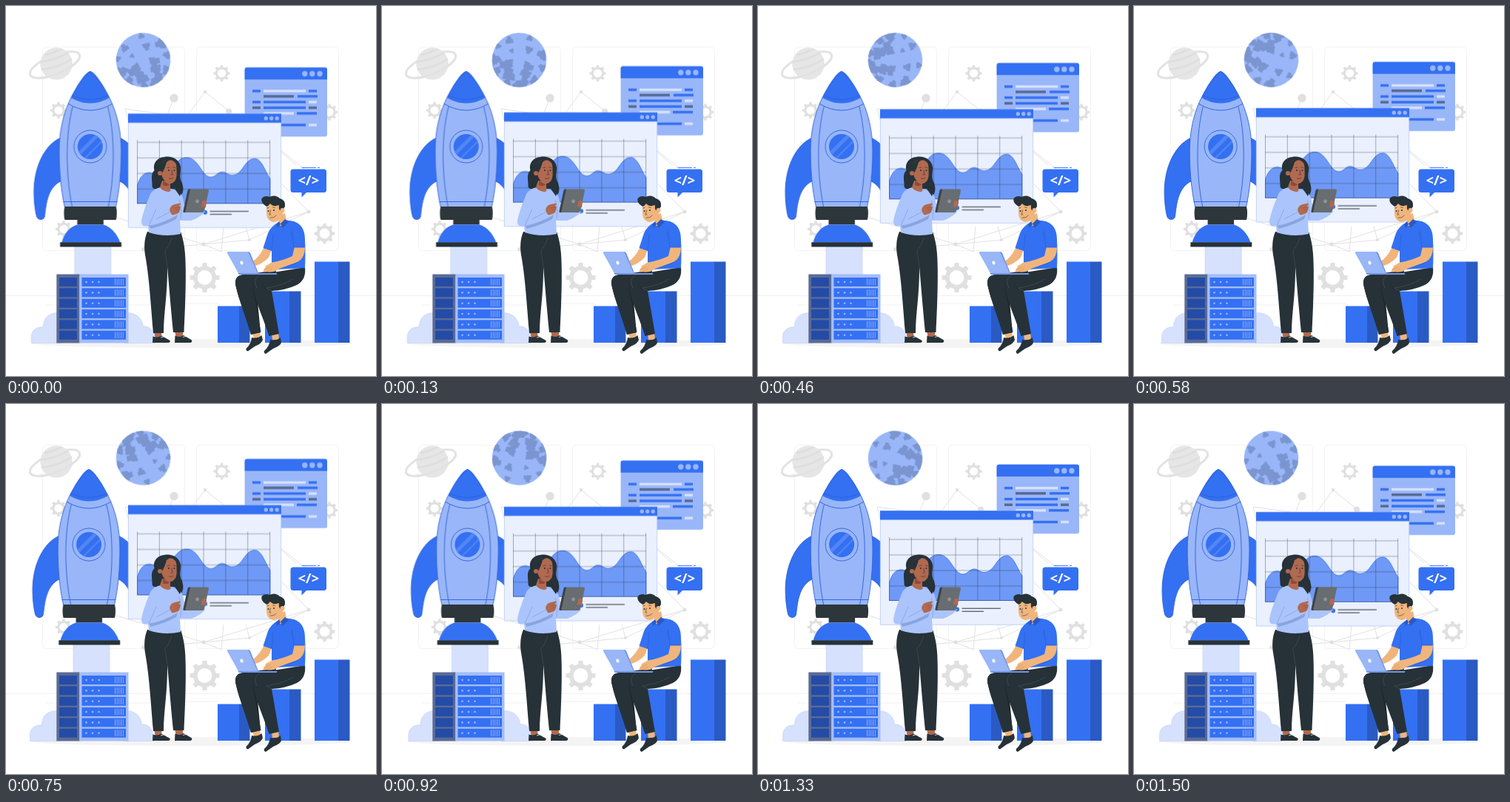
An HTML page that plays this animation: 500x500 px, repeating every 1540 ms.

```html
<!DOCTYPE html>
<html lang="en">
<head>
<meta charset="utf-8">
<title>Launch</title>
<style>
  html, body { margin: 0; width: 100%; height: 100%; overflow: hidden; background: #fff; }
  svg { display: block; width: 100%; height: 100%; }
  .blue { fill: #3470f2; }
  .deep { fill: #2a5ac4; }
  .light { fill: #99b6f9; }
  .pale { fill: #d6e1fd; }
  .ink { fill: #263238; }
  .grey { fill: #e0e0e0; }
  .skin { fill: #b1694f; }
  .tan { fill: #f0b57c; }
  .top { fill: #abc4fb; }
  .line { fill: none; stroke: #e2e2e2; }
  .edge { fill: none; stroke: #2c61d8; stroke-width: .9; }
  .fold { fill: none; stroke: #263238; stroke-width: .6; stroke-linecap: round; }
  .float, .shake, .spin { animation: float 1540ms linear -55ms infinite; }
  .shake { animation-name: shake; }
  .spin { animation-name: spin; transform-origin: 185.5px 73px; }
  @keyframes float { 50% { transform: translateY(-10px); } }
  @keyframes spin { to { transform: rotate(360deg); } }
  @keyframes shake {
    10%, 90% { transform: translateX(-1px); }
    20%, 80% { transform: translateX(2px); }
    30%, 50%, 70% { transform: translateX(-4px); }
    40%, 60% { transform: translateX(4px); }
  }
</style>
</head>
<body>
<svg viewBox="0 0 500 500">
  <defs>
    <clipPath id="disc"><circle cx="185.5" cy="73" r="36.8"/></clipPath>
    <clipPath id="globe"><circle cx="68" cy="78" r="21.7"/></clipPath>
    <clipPath id="pane"><circle cx="113.5" cy="190" r="17"/></clipPath>
    <path id="fin" d="M74 178C54 186 38 214 37.5 250C37.5 264 39 276 41 284C42.5 290 51 290 52 284C54 267 56 242 78 235Z"/>
    <path id="hull" d="M113.5 88C85 116 72 154 71.6 194C71.4 222 74 249 79 271.5H148C153 249 155.6 222 155.4 194C155 154 142 116 113.5 88Z"/>
  </defs>

  <g class="line" stroke-width="1">
    <g stroke="#f3f3f3">
      <rect x="49.5" y="55.5" width="192" height="275" rx="5"/>
      <rect x="257.5" y="55.5" width="192" height="275" rx="5"/>
    </g>
    <path stroke="#f0f0f0" d="M0 391.5H500M53 404H68M165 404H196M242 402H286"/>
    <path d="M161 139L218 147L227 124M246 147L269 116L301 142M161 139L168 165M301 142L340 170L409 225M372 197L392 215M372 240L409 278L329 316L267 322L186 329M150 286L267 322L409 278M186 329L200 296M267 322L291 332L294 298M329 316L324 298"/>
  </g>
  <g class="grey">
    <circle cx="227" cy="124.5" r="5.7"/><circle cx="269" cy="116" r="2.2"/>
    <circle cx="301" cy="142.5" r="4"/><circle cx="409" cy="278" r="2.5"/>
    <circle cx="267" cy="322" r="2.7"/><circle cx="329" cy="316" r="2"/>
    <circle cx="186" cy="329" r="2.7"/>
  </g>
  <g id="gears" class="grey" fill-rule="evenodd"></g>
  <ellipse cx="250" cy="456" rx="216" ry="6" fill="#f4f4f4"/>

  <ellipse cx="66" cy="79.5" rx="36" ry="12.5" class="line" stroke-width="2.8" transform="rotate(-22 66 79.5)"/>
  <circle cx="68" cy="78" r="21.7" fill="#e6e6e6"/>
  <g clip-path="url(#globe)" fill="none" stroke="#dedede" stroke-width="2.5">
    <path d="M44 76Q66 74 90 60M44 86Q70 85 92 70M52 66Q66 64 78 56"/>
  </g>
  <path class="line" stroke-width="2.8" d="M30 79.5A36 12.5 0 0 0 102 79.5" transform="rotate(-22 66 79.5)"/>

  <g class="spin">
    <circle class="light" cx="185.5" cy="73" r="36.8"/>
    <g id="moon" clip-path="url(#disc)" fill="#7b95d0"></g>
  </g>

  <g class="float">
    <rect class="light" x="322.6" y="83.8" width="111.4" height="93.5" rx="3"/>
    <path class="blue" d="M322.6 100V86.800Q322.6 83.800 325.6 83.800H431Q434 83.800 434 86.800V100Z"/>
    <g class="light">
      <circle cx="403.8" cy="92.3" r="3.7"/><circle cx="413.8" cy="92.3" r="3.7"/><circle cx="424" cy="92.3" r="3.7"/>
    </g>
    <g id="code"></g>
  </g>

  <g class="shake">
    <g transform="translate(.6)">
      <g class="pale" stroke="#bccdf8" stroke-width=".6">
        <path d="M34 455.5V447C34 438 42 433 50 434C50 420 59 413 75 415V455.5Z"/>
        <path d="M160 455.5V415C174 413 184 421 185 433C194 432 201 440 201 450V455.5Z"/>
        <path d="M92.5 325H141.5V363H92.5Z"/>
      </g>
      <g id="fins">
        <use href="#fin" class="blue"/><use href="#fin" class="edge"/>
      </g>
      <use href="#fins" transform="matrix(-1 0 0 1 227 0)"/>
      <use href="#hull" class="light"/>
      <path class="blue" d="M113.5 88C118 88 130 103 139.5 124Q113.5 139 87.5 124C97 103 109 88 113.5 88Z"/>
      <g class="edge">
        <use href="#hull"/>
        <path d="M89 121Q113.5 132 138 121M83.5 132Q113.5 150 143.5 132M90 135C80 172 80 226 89 271M137 135C147 172 147 226 138 271M77 264.5H150"/>
        <circle cx="113.5" cy="190" r="22"/>
      </g>
      <circle class="blue" cx="113.5" cy="190" r="17"/>
      <g clip-path="url(#pane)" stroke="#5386f5" fill="none">
        <path stroke-width="5" d="M97 201L126 172"/><path stroke-width="2" d="M104 208L133 179"/>
      </g>
      <path fill="#2d363b" d="M79 271H148.5Q150.5 280 148.5 289H131.5V295.5H96V289H79Q77 280 79 271Z"/>
      <path class="blue" d="M96 295.5H131.5C142 299 150 308 154 319.5H75C78 308 85 299 96 295.5Z"/>
      <path class="ink" d="M72.8 319.2H155.7V325.5H72.8Z"/>
    </g>
  </g>

  <path fill="#5a6b94" d="M68.3 362.5H99.5V455.5H68.3Z"/>
  <path fill="#a4bdf9" d="M99.5 362.5H165.5V455.5H99.5Z"/>
  <g id="racks"></g>

  <g class="float">
    <path d="M165.3 146.4H371.7V300.2H165.3Z" fill="#eaf0fe" stroke="#b5c8f8" stroke-width=".8"/>
    <path class="blue" d="M165 146.2H372V158.6H165Z"/>
    <g class="light">
      <circle cx="351.3" cy="152.5" r="2.7"/><circle cx="358.7" cy="152.5" r="2.7"/><circle cx="366.2" cy="152.5" r="2.7"/>
    </g>
    <path fill="#6f99f6" stroke="#3470f2" stroke-width=".8" d="M177.5 267.5V243C181 231 187 225 195 226C206 228 209 235 217 229C228 216 233 205.5 244 205.5C261 205.5 264 232 277 232C283 232 286 225 292 225C298 225 299 229.5 306 229.5C320 229.5 322 207 336 207C346 207 350 225 357 234V267.5Z"/>
    <g id="grid" fill="none" stroke="#263238" stroke-width=".5" opacity=".75"></g>
    <circle class="blue" cx="269" cy="279.5" r="3"/>
    <path class="fold" style="stroke-width:1" d="M276 278.2H327.5M276 282.2H304.5"/>
  </g>

  <path class="blue" d="M286 405.5H315V455H286ZM350 385.5H383V455H350ZM417 345.5H449V455H417Z"/>
  <path class="deep" d="M315 405.5H329.5V455H315ZM383 385.5H398.5V455H383ZM449 345.5H464.5V455H449Z"/>

  <path class="blue" d="M388 220.5H429.5Q433 220.5 433 224V248.5Q433 252 429.5 252H406L399.5 258.5V252H388Q384.5 252 384.5 248.5V224Q384.5 220.5 388 220.5Z"/>
  <path d="M399.5 218.5H419M421 218.5H424" stroke="#3470f2" stroke-width=".9"/>
  <text x="408.9" y="242.4" text-anchor="middle" fill="#fff" font-size="18.4" font-weight="700" font-family="'Open Sans', sans-serif">&lt;/&gt;</text>

  <g id="woman">
    <path class="ink" d="M214 204C203 205 198 214 200.500 222C194.500 228 198 236 197.500 244Q199 248 204 247H230L236 257.500C241 250 239.500 245 238 239C233 231 237 224 236 217C234 207 224 202 214 204Z"/>
    <path class="skin" d="M200 440H210.5L210 449H202ZM228 439H239L239 449H230Z"/>
    <path class="ink" d="M198.5 446.5Q205 449 210 445.5L221.5 452Q222.5 455 219 455H198Z"/>
    <path class="ink" d="M228.5 445.5Q235 448.5 240 445L251 451.5Q252 454.5 249 455H228Z"/>
    <path d="M209 448L213 447M239 447.5L243 446.5" stroke="#fff" stroke-width=".8"/>
    <path class="ink" d="M191 305C187 314 186 326 188.5 339C194 370 196 410 199 442H213C213 415 218.5 388 218 352C220.5 380 223 412 226 441H240.5C242 410 244 365 242 335C241 322 239 315 236.5 306Z"/>
    <path d="M218 352L215 330M224 313Q220 326 215 330" fill="none" stroke="#46535a" stroke-width=".6"/>
    <path class="top" d="M209 245C201 247 196 250 194 257C189 268 185 280 183 290C182 296 186 299 192 297L193 306Q214 313 236 308L235 290L250 290Q262 286 269 278L264 272Q254 279 242 279C241 268 240 259 236 253Q230 249 223 247Z"/>
    <path d="M193 297Q212 294 232 282L230 288Q215 296 196 301Z" fill="#88a5e0"/>
    <path d="M193 297Q197 288 203 274M236 288Q238 270 234 262M203 288L224 277" fill="none" stroke="#7e9ce0" stroke-width=".7"/>
    <path class="skin" d="M211 236L222 238V247Q224 251 219 251Q211 250 208 245Z"/>
    <path d="M212 237L221 241Q218 245 212 242Z" fill="#8c4a3a"/>
    <path class="skin" d="M210 215Q210 209 218 208Q229 207 231 217C232 227 231 238 223 240C215 240 210 232 210 225Z"/>
    <path class="ink" d="M209 229V214Q213 207 223 207L217 211Q214 222 209 229Z"/>
    <circle class="skin" cx="208" cy="226" r="3"/>
    <path class="ink" d="M230 211Q237 224 234 236Q240 243 238 250L235 257L228 247Q232 238 230 211Z"/>
    <circle class="ink" cx="220" cy="222" r="1"/><circle class="ink" cx="227.5" cy="222" r="1"/>
    <path class="fold" d="M218 218.5L221 218M226 218L229 218.5M224 222L225 228H223M220.5 233Q223 234 226 232.5"/>
    <path class="skin" d="M262 265Q269 261 271 264L270 272Q265 275 260 274Z"/>
    <path d="M247.5 247.5H272.5Q274.5 247.5 274 249.5L268 277Q267.5 279 265 279H241Q239 279 239.6 277L245.5 249.5Q246 247.5 247.5 247.5Z" fill="#686d71"/>
    <path d="M247.5 247.5H249L242 279H241Q239 279 239.6 277L245.5 249.5Q246 247.5 247.5 247.5Z" fill="#3a4349"/>
    <circle cx="258.5" cy="264" r="2.4" fill="#8f9498"/>
    <path class="skin" d="M265 264Q270 261 271 265L269.5 271L264 272Z"/>
    <path class="skin" d="M221 276Q222 269 228 268L235 266.5Q237 268 234 270L236 272L234 279Q229 283 224 282Z"/>
    <path d="M228 273L235 272M229 276L235 275" stroke="#8c4a3a" stroke-width=".5"/>
  </g>

  <g id="man">
    <path class="tan" d="M333 440L343 438L344 449L335 450ZM359 442L368 440L369 451L360 451Z"/>
    <path class="ink" d="M332 448Q340 450 345.5 445L347 451Q346 456 336 460L327 466.5Q324 466 324.5 463Q331 457 332 448Z"/>
    <path class="ink" d="M357 451Q365 453 371 448L372 455Q371 459 361 463L351 470Q348 469 349 466Q356 460 357 451Z"/>
    <path fill="#1e282d" d="M365 357L361 385L338 380L344 441L331 444C325 421 315 399 310.5 378C308.500 368 313 363 323 363Z"/>
    <path class="ink" d="M310.5 378C308.5 368 313 363 323 363H343Q331 366 333.5 382L344.5 441L331 444C325 421 315 399 310.5 378Z"/>
    <path class="ink" d="M404 353Q406 370 393 377Q378 384 359 385L369 443L355.5 446C347 420 338 402 334 382Q331 365 343 363Z"/>
    <path d="M339 381Q333 368 343 364M352 381Q374 378 388 369M359 385L352 381" fill="none" stroke="#4a575e" stroke-width=".6"/>
    <path class="tan" d="M349 326L359 329L355 340Q346 349 334 352L331 347Q341 341 349 326Z"/>
    <path class="blue" d="M367 293Q358 298 354 307L347.5 327L359 331L359 352Q360 357 366 356L404 354Q405 333 404 316Q404 296 389 291L377 289Z"/>
    <path class="edge" d="M359 331L361 309M385 307Q391 316 389 325M361 351Q382 354 395 346"/>
    <path class="tan" d="M390 325H404C404 337 400 344 391 347L369 355Q362 361 352 359Q346 359 349 355L358 347Q374 344 387 338Z"/>
    <path class="blue" d="M386 301Q404 295 404 326H389Z"/>
    <path class="edge" d="M386 304L389 326H404"/>
    <path class="tan" d="M367 285L377 280L379 290Q376 297 370 297Z"/>
    <path class="deep" d="M377 288L382 292L374 300L371 294ZM369 291L371 295L367 300L365 295Z"/>
    <path class="tan" d="M353 266Q362 262 373 267L376 272Q374 291 361 292Q351 290 352 276Z"/>
    <path class="ink" d="M352 271Q344 266 345.5 260Q350 255 356 258Q364 254 370 260Q378 262 377 271L374 275L371 277Q368 274 369 269Q361 272 357 267Q355 270 352 271Z"/>
    <circle class="tan" cx="373.5" cy="276" r="3"/>
    <circle class="ink" cx="354.5" cy="277" r="1"/><circle class="ink" cx="362" cy="276" r="1"/>
    <path class="fold" d="M352.5 273L355 272.5M360.5 272L363.5 272.5M357.5 276L356 282H358M357 286Q362 287 365 283"/>
    <path class="light" d="M300 332H327Q329 332 330 334L341 361H314L299 334Q298 332 300 332Z"/>
    <path d="M327 332Q329 332 330 334L341 361L340 361Z" fill="#6f94e4"/>
    <ellipse cx="318.5" cy="347" rx="2" ry="2.6" fill="#fff" transform="rotate(-20 318.5 347)"/>
    <path d="M313 361H366Q367 363 364 363H315Z" fill="#7397e8"/>
    <path class="tan" d="M351 351L361 346L369 353Q365 359 358 359L349 359.5Q346 358 350 355Z"/>
    <path d="M350 356L358 352M352 359L360 355" stroke="#d48f56" stroke-width=".6"/>
  </g>
</svg>
<script>
  const put = (id, html) => { document.getElementById(id).innerHTML = html; };
  const range = n => [...Array(n).keys()];
  const bar = (x, y, w, h, fill) => `<rect x="${x}" y="${y}" width="${w}" height="${h}" fill="${fill}"/>`;
  const ring = (n, at) => 'M' + range(n).map(i => at(i).map(v => v.toFixed(2)).join(' ')).join('L') + 'Z';
  const polar = (x, y, r, a) => [x + r * Math.cos(a), y + r * Math.sin(a)];

  // Each of the eight teeth takes four corners: two at the tip, two at the root.
  const gear = ([x, y, r]) => {
    const teeth = ring(32, i => polar(x, y, r * (i % 4 < 2 ? 1 : .78),
      (Math.floor(i / 4) + [-.18, .18, .27, .73][i % 4]) * Math.PI / 4));
    const hole = ring(24, i => polar(x, y, r * .49, i * Math.PI / 12));
    return `<path d="${teeth}${hole}"/>`;
  };
  put('gears', [[291.5, 91, 11.3], [71, 141, 11.3], [437, 143.5, 11.3], [78, 301.5, 11.3],
    [430.5, 307.5, 14], [268.5, 367, 20.2]].map(gear).join(''));

  // Ragged patches on the moon: x, y, radius from its centre.
  const patch = ([x, y, r], k) => `<path d="${ring(20, i => {
    const a = i * Math.PI / 10;
    return polar(185.5 + x, 73 + y, r * (1 + .22 * Math.sin(3 * a + k * 1.7) + .16 * Math.sin(7 * a + k)), a);
  })}"/>`;
  put('moon', [[-7, 17, 9], [4, 24, 8], [15, -1, 7], [20, 9, 7], [26, 23, 10], [34, 6, 6],
    [-25, 23, 8], [-13, 35, 8], [10, 36, 7], [-28, -10, 5], [0, -19, 5], [18, -27, 7],
    [-10, -31, 4], [-34, 6, 4], [30, -14, 5], [-16, -2, 3]].map(patch).join(''));

  const tint = { b: '#3470f2', p: '#d6e1fd', s: '#56698f' };
  const rows = [
    [115.4, 'b333-344 p348-405 b409-420'],
    [122.6, 's348-389 b394-421'],
    [130.3, 'b333-344 b348-405 p409-420'],
    [138, 's333-344 b348-405 s409-420'],
    [145.6, 'p348-389 b393-420'],
    [161.3, 'b348-405 p409-420']
  ];
  put('code', rows.map(([y, spec]) => spec.split(' ').map(s => {
    const [a, b] = s.slice(1).split('-');
    return bar(a, y - 1.5, b - a, 3.4, tint[s[0]]);
  }).join('')).join(''));

  put('racks', range(6).map(i => {
    const y = 367 + i * 14.35;
    return bar(72, y, 24, 12, '#244ba6') + bar(102.5, y, 59.5, 12, '#3470f2')
      + range(3).map(k => `<circle cx="${108.5 + k * 8.5}" cy="${y + 6}" r="1.3" fill="#99b6f9"/>`).join('')
      + range(5).map(k => bar(147 + k * 2.7, y + 1.7, .8, 8.6, '#a4bdf9')).join('');
  }).join(''));

  put('grid', `<path d="${range(7).map(i => `M${177.5 + i * 29.85} 182V267.5`).join('')}${
    [185, 206, 227, 248, 267.5].map(y => `M177 ${y}H357`).join('')}"/>`);
</script>
</body>
</html>
```
